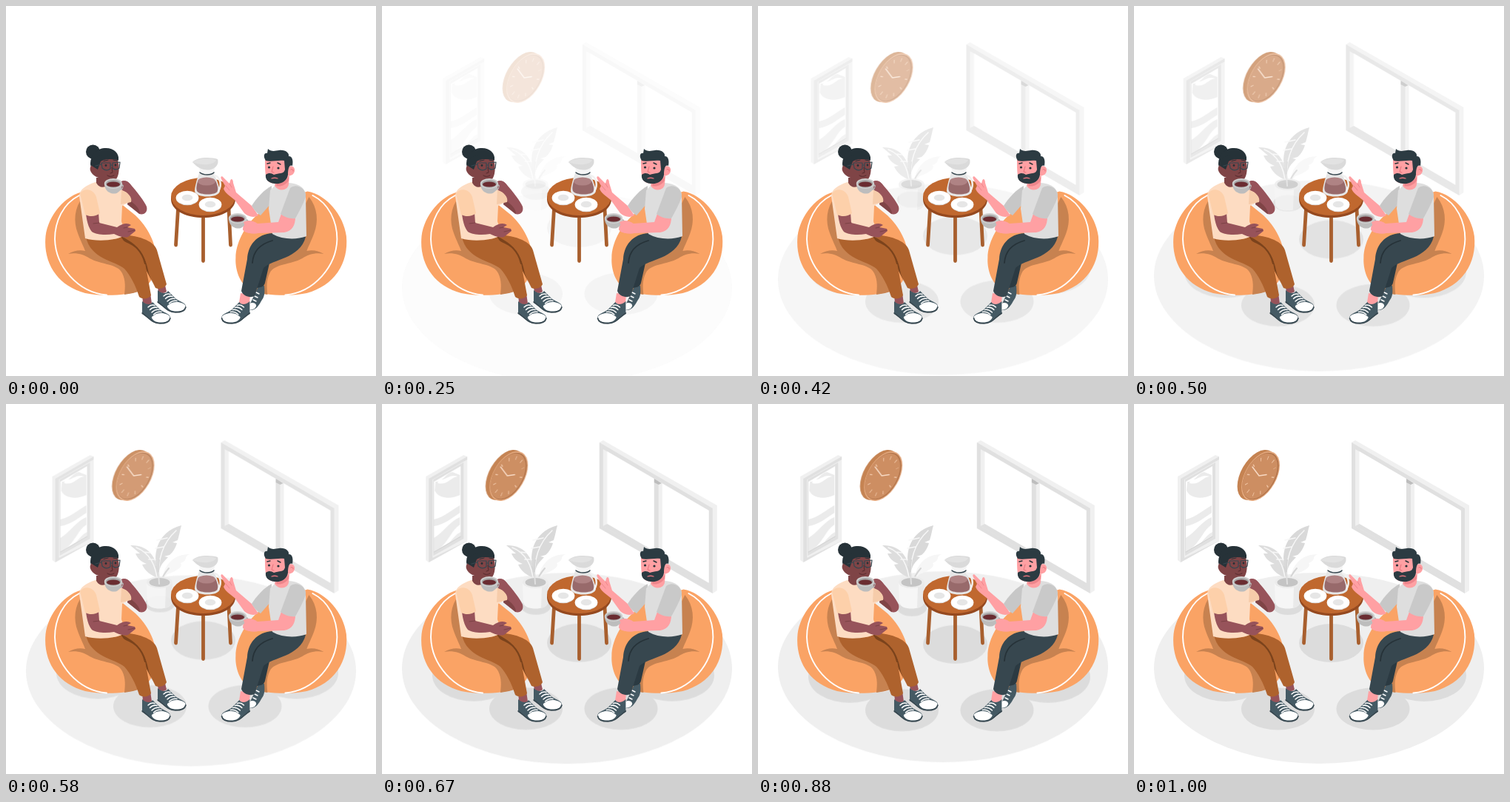
An HTML page for the animation above (1.04 s loop, 500x500 px).

```html
<!DOCTYPE html>
<html lang="en">
<head>
<meta charset="utf-8">
<title>Coffee chat</title>
<style>
html, body { margin: 0; width: 100%; height: 100%; overflow: hidden; background: #fff; }
svg { display: block; width: 100vw; height: 100vh; }
.enter { animation: enter 1040ms infinite; }
.from-right { --dx: 30px; }
.from-left { --dx: -30px; }
.from-below { --dy: 30px; }
.from-above { --dy: -30px; }
@keyframes enter {
  0% {
    opacity: 0;
    transform: translate(var(--dx, 0px), var(--dy, 0px));
    animation-timing-function: cubic-bezier(.36, -.01, .5, 1.38);
  }
  96.154%, 100% { opacity: 1; transform: none; }
}
.line { fill: none; stroke-linecap: round; stroke-linejoin: round; }
.ink { fill: #263238; }
.dark { fill: #37474f; }
.brown { fill: #97535a; }
.face { fill: #7f4446; }
.pink { fill: #ffa0a3; }
.front { fill: #e0e0e0; }
.edge { fill: #f0f0f0; }
</style>
</head>
<body>
<svg viewBox="0 0 500 500">
  <defs>
    <g id="bag">
      <path fill="#faa365" d="M106 250.500C80 255 57 283 53.500 311C50 348 70 378 107 388C132 393 163 391 181 385C199 376 204 354 203 340C203 321 191 298 175 283L154 266Z"/>
      <path fill="#c78250" d="M104 258C92 273 91 291 97 307C101 318 105 325 107 331C99 329 91 331 84 335C96 333 105 336 113 341C129 350 151 348 157 361C162 371 161 381 160 390C168 389 176 387 181 385L185 350L125 300Z"/>
      <path class="line" stroke="#fff" stroke-width="1.9" d="M99 256C77 267 66 291 66 315C67 352 97 387 136 390.500"/>
    </g>
    <g id="shoe">
      <path fill="#455a64" d="M184 399C189 404 196 404 198 400L209 411C215 415 221 416 222 420C222 427 215 429 207 429C197 429 191 420 184 416Z"/>
      <path fill="#fff" d="M200 418C206 413 217 415 221.500 419.500C221 427 214 428 207 427.500C200 427 196 422 197 420Z"/>
      <path class="line" stroke="#37474f" stroke-width="1.500" d="M184 415C192 420 197 429 208 429C216 429 221 427 222 422"/>
      <path class="line" stroke="#fff" stroke-width="1.500" d="M192 407Q196 403 201 404.500M194.500 410.500Q199 406 204 407.500M197 414Q202 409.500 207 410.500M199.500 417Q204 412.500 210 413.500"/>
    </g>
    <g id="cup">
      <path class="line" stroke="#b5b5b5" stroke-width="2" d="M10 2C15 1 15 7 9 8"/>
      <path fill="#bdbdbd" d="M-12 0C-12 7-8 11-5 12C-2 14 4 14 6 12C9 10 12 7 12 0Z"/>
      <ellipse rx="12.200" ry="7" fill="#cfcfcf"/>
      <ellipse cy=".3" rx="10.300" ry="5.300" fill="#a6a6a6"/>
      <ellipse cy="1" rx="9" ry="3.600" fill="#6a2c31"/>
    </g>
    <g id="plate">
      <ellipse cy=".8" rx="15.300" ry="9.500" fill="#dedede"/>
      <ellipse rx="15.300" ry="9.300" fill="#fff"/>
      <ellipse rx="7.300" ry="4.300" fill="#e6e6e6"/>
    </g>
  </defs>

  <ellipse class="enter from-below" cx="250" cy="357" rx="223" ry="129" fill="#efefef"/>

  <g class="enter from-above" fill="#dcdcdc">
    <ellipse cx="124" cy="367" rx="56" ry="35"/>
    <ellipse cx="392" cy="367" rx="57" ry="35"/>
    <ellipse cx="194.500" cy="412" rx="49.500" ry="28.500"/>
    <ellipse cx="323" cy="412" rx="49.500" ry="28.500"/>
    <ellipse cx="266.500" cy="323" rx="43.500" ry="26"/>
    <ellipse cx="208" cy="274" rx="20" ry="11"/>
  </g>

  <!-- window -->
  <g class="enter from-left">
    <path class="edge" d="M294 52L299 49L453 137V252L447 256L440 240L300 80Z"/>
    <path class="front" d="M294 52L447 141V256L294 168Z"/>
    <path class="edge" d="M299 61L442 144V247L299 165Z"/>
    <path fill="#fff" d="M304.500 64L442 144V242L304.500 162Z"/>
    <path class="front" d="M299 165L304.500 162L442 242V248Z"/>
    <path class="front" d="M368 101L374 104V208L368 205Z"/>
    <path class="edge" d="M374 104L379 107V208L374 208Z"/>
    <path fill="#bdbdbd" d="M368 101L378 107L374 109L368 106Z"/>
  </g>

  <!-- clock -->
  <g class="enter from-right">
    <g transform="matrix(.866 -.5 0 1 166 96)"><circle r="30.500" fill="#c58352"/></g>
    <g transform="matrix(.866 -.5 0 1 171 97.500)">
      <circle r="30" fill="#e5aa80"/>
      <circle r="28.500" fill="#b2744a"/>
      <circle cx="-1" cy="-.5" r="27.500" fill="#cd8e62"/>
      <circle r="22" fill="none" stroke="#f0c5a5" stroke-width="4.500" stroke-dasharray="1.200 10.319" stroke-dashoffset=".6"/>
    </g>
    <path class="line" stroke="#f7d9c3" stroke-width="1.500" d="M160 85L169 97L179 95.500"/>
  </g>

  <!-- picture -->
  <g class="enter from-right">
    <path class="edge" d="M59 98L110 69L115 71V185L63 214L59 211Z"/>
    <path class="front" d="M63 101L115 71V185L63 214Z"/>
    <path class="edge" d="M68 102L115 75V185L68 208Z"/>
    <path class="front" d="M69 102L110 79V182L69 205Z"/>
    <path fill="#fff" d="M70 105L106 84V178L70 200Z"/>
    <path fill="#ebebeb" d="M72 105C82 106 86 93 95 92L105 96V123C92 129 76 128 71 117ZM70 156C84 153 95 142 105 137V147C94 154 84 163 70 165ZM70 181C82 174 92 158 105 153V163C94 170 90 185 78 195L70 200ZM91 187C96 181 100 176 106 173V178Z"/>
    <path fill="#fff" d="M76 102C87 104 90 94 102 98C92 99 89 110 75 107Z"/>
    <path class="line" stroke="#d2d2d2" d="M70 200L106 179"/>
  </g>

  <!-- plant -->
  <g class="enter">
    <path fill="#f6f6f6" d="M211 238C213 218 226 203 248 203C239 207 247 211 236 215C240 220 230 226 218 230Z"/>
    <path fill="#ddd" d="M168 191C190 190 205 204 207 236C196 232 188 226 184 217L190 216C182 213 178 209 175 202L181 202Z"/>
    <path fill="#d9d9d9" d="M206 230C197 207 202 173 237 164C235 171 234 178 232 184L225 187L231 188C229 195 225 201 221 204L214 206L219 207C214 213 209 215 206 230Z"/>
    <path class="line" stroke="#f7f7f7" stroke-width="1.500" d="M176 194C194 201 203 218 205 242M230 171C211 188 204 213 207 242M202 195L213 193M204 184L218 181M186 200L195 201M193 210L202 210"/>
    <path class="line" stroke="#d5d5d5" stroke-width="2" d="M207 241Q205 223 207 211M206 240Q206 228 203 220M209 241Q212 231 220 222"/>
    <path fill="#f6f6f6" d="M190 242L191 269C193 279 222 279 224 269L225 242Z"/>
    <path fill="#e9e9e9" d="M216 247L225 242L224 269C223 273 219 275 215 276Z"/>
    <ellipse cx="207.500" cy="241" rx="17.500" ry="8" fill="#ececec"/>
    <ellipse cx="207.500" cy="241" rx="14" ry="6" fill="#c4c4c4"/>
    <path class="line" stroke="#e0e0e0" stroke-width="2" d="M207 243L206 228"/>
  </g>

  <!-- table -->
  <g class="line" stroke="#a85f2e" stroke-width="4.800">
    <path d="M232.500 274L229.500 323M301 274L303.500 323M266.500 284V344.500"/>
  </g>
  <path fill="#95491f" d="M223 257V262C226 294 307 294 310 262V257Z"/>
  <ellipse cx="266.500" cy="257.500" rx="43.500" ry="25.500" fill="#c0682f"/>
  <use href="#plate" x="245" y="259"/>
  <use href="#plate" x="276" y="268"/>

  <!-- coffee maker -->
  <path fill="#e6e6e6" d="M261 226C257 237 255 246 255 250C256 260 288 260 289 250C288 243 284 233 281 226Z"/>
  <path fill="#986a6b" d="M259 237C257 244 257 247 258 250C261 256 284 256 286 250C287 246 285 240 283 236Z"/>
  <ellipse cx="271" cy="237" rx="12" ry="5.500" fill="#af8384"/>
  <path fill="#f5f5f5" d="M261 218L263 225C269 229 277 228 281 224L283 216Z"/>
  <path class="line" stroke="#37474f" stroke-width="1.600" d="M262 225C267 229 277 229 281 225"/>
  <path fill="#dadada" d="M252 211C258 204 276 204 286 207C288 213 284 219 277 221C267 223 259 219 252 211Z"/>
  <path fill="#e2e2e2" d="M252 211C260 205 276 205 284 208C282 214 268 217 252 211Z"/>
  <path class="line" stroke="#f2f2f2" stroke-width="2.500" d="M282 229C290 231 292 243 287 250"/>

  <use href="#bag"/>
  <use href="#bag" transform="matrix(-1 0 0 1 513.400 0)"/>

  <!-- woman: legs -->
  <path class="brown" d="M204 376L214 373L217 386Q212 390 206 386ZM184 390L195 388L197 402Q191 405 185 401Z"/>
  <use href="#shoe" x="21" y="-15"/>
  <use href="#shoe"/>
  <path fill="#ae622d" d="M150 309C178 309 200 317 204 330L217 376C214 382 207 383 202 381L183 343L150 330Z"/>
  <path fill="#7b431c" d="M154 312C177 322 189 335 193 362L198 374L186 350L160 319Z"/>
  <path fill="#ae622d" d="M108 312C125 318 152 317 161 309C154 314 158 318 166 321C180 328 187 337 189 353L196 391C193 396 184 397 180 393C175 377 168 364 160 355C147 344 114 342 108 312Z"/>
  <path class="line" stroke="#7b431c" stroke-width="2.200" d="M157 313C172 321 184 330 188 348"/>

  <!-- woman: torso and arms -->
  <path class="brown" d="M153 239C158 234 165 236 169 242C177 251 187 264 190 271C192 278 187 283 180 281L164 268L168 258L155 249Z"/>
  <path class="face" d="M166 262C175 268 181 274 181 281L164 268Z"/>
  <path fill="#fddcc2" d="M121 238C108 242 99 248 99 257L107 314C123 319 151 317 162 309L156 291L157 270L168 264C169 254 158 248 147 244L138 239Z"/>
  <path fill="#f6ccaa" d="M156 249C164 251 171 258 169 265L155 268Z"/>
  <path class="face" d="M122 232L138 232L137 243Q127 248 122 239Z"/>
  <path class="brown" d="M108 281L125 279L126 293L150 299C158 293 165 293 169 296L164 299L174 301L175 304L165 312C158 314 151 310 146 308C134 310 122 309 116 305C111 299 109 289 108 281Z"/>
  <path class="line" stroke="#7b4144" stroke-width="1" d="M126 293L118 294M164 299L159 300M174 303L165 305"/>
  <path fill="#fdd0aa" d="M100 253C108 244 119 249 122 258L127 280C121 285 113 285 107 282Z"/>

  <!-- woman: head -->
  <circle class="ink" cx="117.500" cy="197" r="9.500"/>
  <path class="ink" d="M114 214C114 200 123 192 135 192C146 192 153 199 152 208L146 216L125 224L116 222Z"/>
  <path class="face" d="M122 213C127 207 139 206 151 208C154 217 153 230 148 235C141 241 129 239 125 232C116 229 111 221 115 216Q118 213 123 219Z"/>
  <path class="ink" d="M117 207C123 200 139 201 152 204V207C143 206 133 206 128 210L124 221L116 216Z"/>
  <path class="line" stroke="#37474f" stroke-width="1.200" d="M129 212H141V220Q135 224 130 219ZM144 212L154 211L153 219Q148 223 144 219ZM141 215H144M129 214L121 216"/>
  <path class="line" stroke="#263238" d="M132 209.500L138 208M145 208L150 209"/>
  <circle class="ink" cx="135" cy="215.500" r="1.400"/>
  <circle class="ink" cx="148" cy="215" r="1.400"/>
  <path class="line" stroke="#55292c" stroke-width="1" d="M143 218L144 225L141 226M137 229Q141 232 146 229"/>
  <use href="#cup" x="145" y="240"/>
  <path class="brown" d="M156 237C161 234 167 238 170 244L165 252L157 249L159 243Z"/>

  <!-- man: legs -->
  <path fill="#455a64" d="M342 377L349 378C350 388 349 393 346 397C342 404 338 411 331 411C327 409 328 405 331 400Z"/>
  <path fill="#fff" d="M329 402C335 399 339 403 338 406C335 411 331 411 328 410Z"/>
  <path class="line" stroke="#fff" stroke-width="1.400" d="M334 397L338 399M336 392L340 394M338 387L342 389"/>
  <path fill="#2b3a42" d="M334 346L357 343L350 374C349 379 344 381 337 381L329 390Z"/>
  <path class="pink" d="M317 388L330 390L329 402Q322 406 315 401Z"/>
  <use href="#shoe" transform="matrix(-1 0 0 1 513.400 0)"/>
  <path class="dark" d="M361 307C338 308 327 324 326 342L318 385C320 392 330 395 336 392L348 354C360 342 397 342 405 312Z"/>
  <path class="line" stroke="#263238" stroke-width="1.800" d="M360 317C342 322 334 332 333 347"/>

  <!-- man: torso and arms -->
  <path class="pink" d="M341 283C334 287 327 284 322 280L309 262C302 256 296 253 294 247L296 243L291 234C289 230 292 229 294 232L302 240L303 236C305 232 307 235 307 239L311 252L332 270Z"/>
  <path class="line" stroke="#e97f86" stroke-width=".8" d="M297 243L302 249M302 240L305 245"/>
  <path fill="#c7c7c7" d="M359 243C349 248 338 260 332 270Q337 279 344 283L358 267Z"/>
  <path fill="#dedede" d="M364 242L382 239C395 240 405 245 405 257L406 311C393 316 374 316 360 308L355 274L357 249Z"/>
  <path class="pink" d="M372 281L391 285C391 296 387 304 376 306L341 307C333 309 323 306 320 302L321 292C327 289 334 290 340 294L368 292Z"/>
  <path fill="#c9c9c9" d="M384 246C393 239 406 247 405 258C401 269 396 278 391 287C384 288 376 285 371 281Z"/>
  <path class="pink" d="M364 235L383 229L382 241C381 249 369 252 363 243Z"/>
  <path fill="#ed858b" d="M366 240C374 240 379 235 382 231L382 236C378 242 371 245 365 243Z"/>

  <!-- man: head -->
  <path class="pink" d="M350 207L378 207L381 218C386 214 391 218 390 223C389 228 385 230 381 229C379 239 365 243 356 238C350 235 350 223 350 207Z"/>
  <path fill="#2c3b42" d="M351 209C347 203 349 198 353 199L354 193C358 197 363 196 369 195C378 194 383 199 382 203C388 203 388 211 387 216C383 214 381 219 381 228C380 236 373 241 363 240C354 239 350 234 351 228C355 225 359 226 362 228C369 225 375 228 377 221L376 209C367 208 358 211 351 209Z"/>
  <path class="line" stroke="#e5737c" stroke-width="1.300" d="M359 233Q363 231.500 367 233"/>
  <circle class="ink" cx="355.500" cy="218" r="1.600"/>
  <circle class="ink" cx="368" cy="219" r="1.600"/>
  <path class="line" stroke="#263238" stroke-width="1.400" d="M353 213L357 212M367 212L371 214"/>
  <path class="line" stroke="#e5737c" stroke-width="1" d="M361 217L359 224L362 225M385 221Q388 219 388 223"/>
  <use href="#cup" x="313" y="287"/>
  <path class="pink" d="M321 292C326 289 333 290 338 293L339 306C330 309 322 306 320 302L323 298Z"/>
</svg>
</body>
</html>
```
